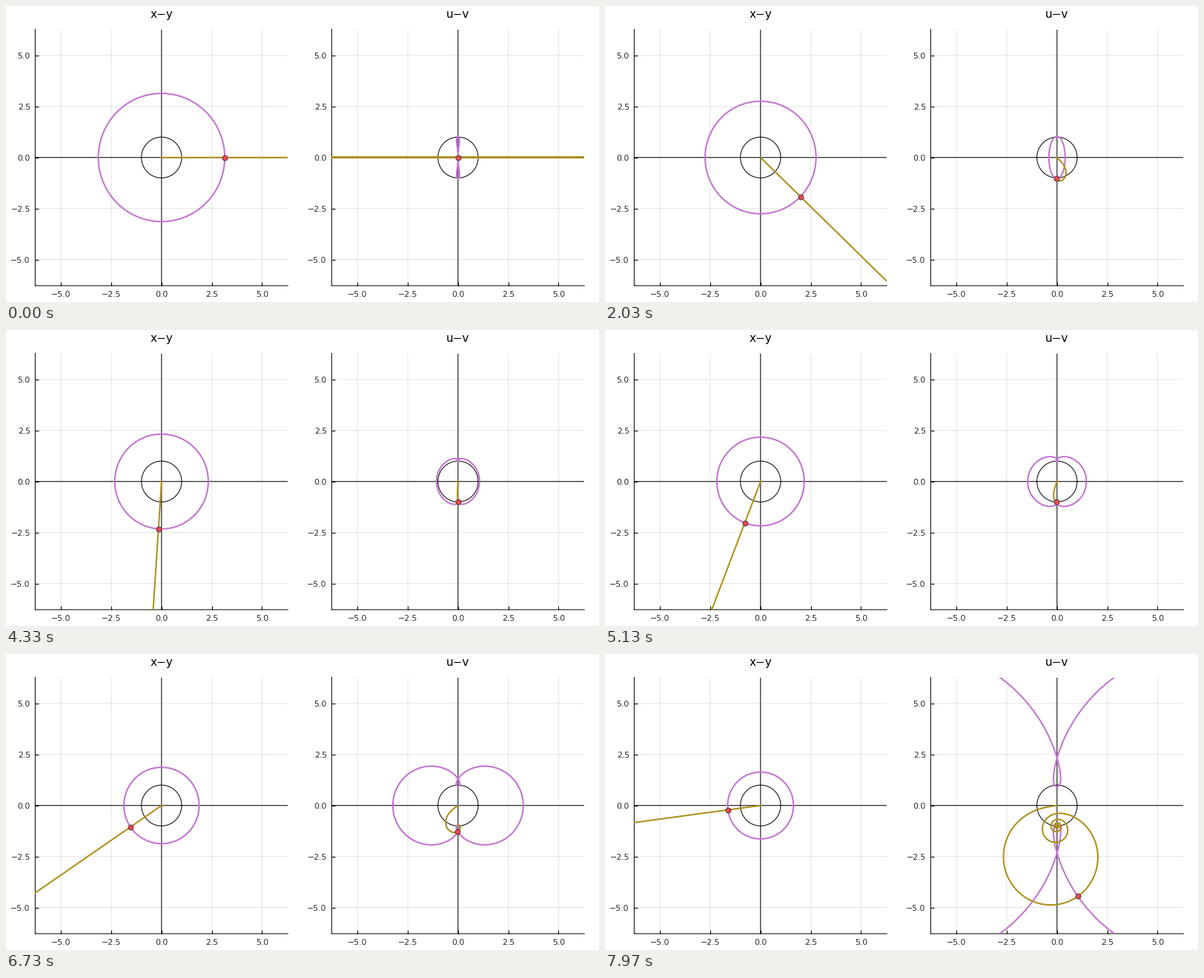
These frames come from a looping animation (800 px wide and 400 px high, 8000 ms). A matplotlib script:

```python
import numpy as np
import matplotlib.pyplot as plt
from matplotlib.animation import FuncAnimation

W, H, DPI = 800, 400, 100
TICK_MS, LOOP_MS = 20, 8000
STEPS = 499          # steps of the full sweep, the loop shows the first 240
PX = 72 / DPI        # one pixel in points
PURPLE, GOLD = "#c371d2", "#ac8e18"
LIM = 2 * np.pi
TICKS = [-5, -2.5, 0, 2.5, 5]

plt.rcParams.update({
    "font.family": "DejaVu Sans",
    "path.simplify": False,
    "path.snap": False,
    "axes.linewidth": PX,
})

fig = plt.figure(figsize=(W / DPI, H / DPI), dpi=DPI, facecolor="white")

unit = np.exp(1j * np.linspace(0, 2 * np.pi, 801))
reach = np.linspace(0, 20, 1601)


def make_panel(left, title):
    top, bottom, width = 31.5, 377.95, 340.94
    ax = fig.add_axes([left / W, 1 - bottom / H, width / W, (bottom - top) / H])
    ax.set(xlim=(-LIM, LIM), ylim=(-LIM, LIM), xticks=TICKS, yticks=TICKS)
    labels = [f"{t:.1f}".replace("-", "\u2212") for t in TICKS]
    ax.set_xticklabels(labels)
    ax.set_yticklabels(labels, va="center_baseline")
    ax.spines[["top", "right"]].set_visible(False)
    ax.tick_params(direction="in", length=5 * PX, width=PX,
                   labelsize=11 * PX, labelcolor="#2a2a2a")
    ax.tick_params(axis="x", pad=7.3 * PX)
    ax.tick_params(axis="y", pad=6.5 * PX)
    ax.set_axisbelow(True)
    ax.grid(color="black", alpha=0.1, lw=PX)
    fig.text((left + width / 2) / W, 1 - 16 / H, title, size=15.2 * PX,
             ha="center", va="baseline", color="black")

    ax.axhline(0, color="black", lw=PX, zorder=2)
    ax.axvline(0, color="black", lw=PX, zorder=2)
    ax.plot(unit.real, unit.imag, color="black", lw=PX, zorder=2)

    ring, = ax.plot([], [], color=PURPLE, lw=2 * PX, zorder=3)
    ray, = ax.plot([], [], color=GOLD, lw=2 * PX, zorder=4)
    dot, = ax.plot([], [], "o", ms=7 * PX, mfc="#f2444f", mec="#444444",
                   mew=PX, zorder=5)
    return ring, ray, dot


plane = make_panel(39.37, "x\u2212y")
image = make_panel(439.37, "u\u2212v")


def update(tick):
    # three steps in every 100 ms, at 20, 60 and 100
    step = (3 * tick + 2) // 5
    radius = np.pi * (1 - step / STEPS)
    heading = np.exp(-2j * np.pi * step / STEPS)
    shapes = radius * unit, reach * heading, np.array([radius * heading])
    for z, line, mapped in zip(shapes, plane, image):
        w = np.tan(z)
        line.set_data(z.real, z.imag)
        mapped.set_data(w.real, w.imag)
    return plane + image


anim = FuncAnimation(fig, update, frames=LOOP_MS // TICK_MS, interval=TICK_MS,
                     repeat=True, repeat_delay=0, blit=False)
plt.show()
```
